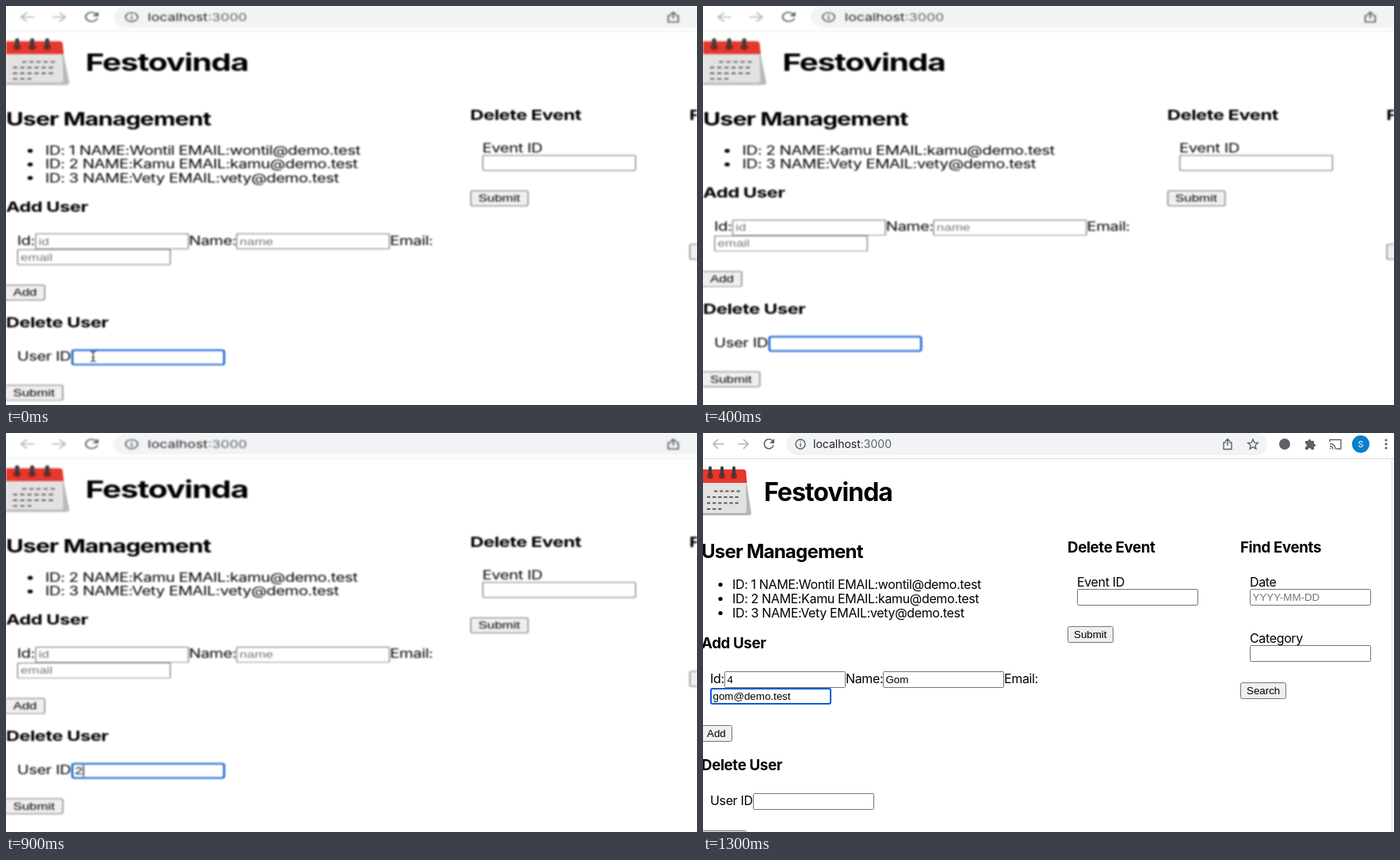
These frames come from a looping animation (872 px wide and 504 px high, 1500 ms). An HTML page:

```html
<!DOCTYPE html>
<html lang="en">
<head>
<meta charset="utf-8">
<title>User list</title>
<style>
  html, body { margin: 0; width: 100%; height: 100%; overflow: hidden; background: #fff; }
  svg { display: block; width: 872px; height: 504px; }
  text { font: 16px Inter, sans-serif; letter-spacing: -.022em; font-optical-sizing: none; white-space: pre; }
  .h1 { font-size: 32px; font-weight: 700; letter-spacing: -.031em; }
  .h2 { font-size: 24px; font-weight: 700; letter-spacing: -.032em; }
  .h3 { font-size: 18.72px; font-weight: 700; letter-spacing: -.02em; }
  .ui { font: 13.33px "Liberation Sans", Arial, sans-serif; letter-spacing: 0; }
  .hint { fill: #757575; }
  .url { font-size: 14px; letter-spacing: 0; fill: #202124; }
  .icon { fill: none; stroke: #5f6368; stroke-width: 1.6; }
  .thin { stroke-width: 1.4; }
  .off { stroke: #b4b6b9; }
</style>
</head>
<body>
<svg id="stage" viewBox="0 0 872 504"></svg>
<script>
const stage = document.getElementById('stage');
const LOOP = 1500;
const ROW = 18;

const users = ['Wontil', 'Kamu', 'Vety'].map((name, i) =>
  `ID: ${i + 1} NAME:${name} EMAIL:${name.toLowerCase()}@demo.test`);

// Each scene lasts until the next one starts
const filled = { zoom: false, removed: 0, add: ['4', 'Gom', 'gom@demo.test'], focus: 'email' };
const scenes = [
  { at: 0, removed: 0, pointer: true },
  { at: 200, removed: 0, userId: '1', caret: true },
  { at: 400, removed: 1 },
  { at: 600, removed: 1, caret: true },
  { at: 800, ...filled },
  { at: 900, removed: 1, userId: '2', caret: true },
  { at: 1100, removed: 2 },
  { at: 1300, ...filled },
].map(scene => ({ zoom: true, add: ['', '', ''], userId: '', focus: 'userId', ...scene }));

const text = (x, y, str, cls = '') => `<text x="${x}" y="${y}" class="${cls}">${str}</text>`;
const path = (d, cls = 'icon') => `<path d="${d}" class="${cls}"/>`;
const fill = (d, color) => `<path d="${d}" fill="${color}"/>`;

function input(x, y, value = '', hint = '', focused = false) {
  const edge = focused
    ? `x="${x + 1}" y="${y + 1}" width="151" height="19" rx="2" stroke="#0b5ecf" stroke-width="2"`
    : `x="${x + .5}" y="${y + .5}" width="152" height="20" rx="1" stroke="#767676"`;
  return `<rect ${edge} fill="#fff"/>` + text(x + 3.5, y + 15, value || hint, value ? 'ui' : 'ui hint');
}

const button = (x, y, w, label) =>
  `<rect x="${x + .5}" y="${y + .5}" width="${w - 1}" height="20" rx="2" fill="#efefef" stroke="#767676"/>` +
  text(x + 8, y + 15, label, 'ui');

const toolbar =
  '<rect x="105" y="0" width="607" height="28" rx="14" fill="#f1f3f4"/>' +
  '<path d="M-4 32.5H876M869.5 33V540" stroke="#dcdee1"/>' +
  path('M26 14H13M19 8L13 14L19 20M44 14H57M51 8L57 14L51 20', 'icon off') +
  path('M88 10A6 6 0 1 0 89 15.5') + fill('M90 7V13H84z', '#5f6368') +
  path('M129 14A6 6 0 1 1 117 14A6 6 0 1 1 129 14M123 13V17.5M123 10V11.6', 'icon thin') +
  text(139, 19, 'localhost<tspan fill="#5f6368">:3000</tspan>', 'url') +
  path('M660 12H657V20.5H667V12H664M662 16V8M659 10.5L662 7.5L665 10.5', 'icon thin') +
  path('M694 8L695.8 12.2L700.3 12.6L696.9 15.5L697.9 20L694 17.6L690.1 20L691.1 15.5L687.7 12.6L692.2 12.2z',
    'icon thin') +
  '<circle cx="734" cy="14" r="7" fill="#5f6368"/>' +
  fill('M760 10H763.5A2 2 0 1 1 767.5 10H771V13.5A2 2 0 1 1 771 17.5V21H767.5A2 2 0 0 0 763.5 21H760V17.5A2 2 0 0 0 760 13.5z',
    '#5f6368') +
  path('M791 11V8.5H805V20H799M791 19.5H792.5M791 16.5Q795 16.5 795 20.5M791 13.5Q798 13.5 798 20.5', 'icon thin') +
  '<circle cx="830" cy="14" r="11" fill="#0b80c8"/>' +
  '<text x="830" y="18" text-anchor="middle" style="font-size:11px;fill:#fff">S</text>' +
  [9, 14, 19].map(y => `<circle cx="862" cy="${y}" r="1.6" fill="#5f6368"/>`).join('');

const calendar =
  fill('M-4 62H55L61 101Q61 104 58 104H-4z', '#b9b9b9') +
  fill('M-4 60H54L55 98Q55 101 52 101H-4z', '#e2e2e2') +
  fill('M-4 46H51Q54 46 54.3 49L55.5 63H-4z', '#e5392d') +
  [9, 24, 39].map(x =>
    `<circle cx="${x}" cy="54" r="4" fill="#a51f1b"/>` +
    `<path d="M${x} 44V54" stroke="#3c3a3c" stroke-width="4" stroke-linecap="round"/>`).join('') +
  '<path d="M14 73.5H47M5 81H47M5 88.5H47M5 96H25" stroke="#5d5d60" stroke-width="2" stroke-dasharray="4.2 2.9"/>';

const events =
  text(460, 151, 'Delete Event', 'h3') + text(472, 194, 'Event ID') +
  input(472, 197) + button(460, 244, 58, 'Submit') +
  text(678, 151, 'Find Events', 'h3') + text(690, 194, 'Date') +
  input(690, 197, '', 'YYYY-MM-DD') + text(690, 265, 'Category') +
  input(690, 268) + button(678, 315, 58, 'Search');

const userList = removed => users.slice(removed).map((user, i) =>
  `<circle cx="22" cy="${191.5 + i * ROW}" r="2.6"/>` + text(37, 197 + i * ROW, user)).join('');

const pointerMark = '<path fill="none" stroke="#222" d="M82 457.5Q84.7 457.5 84.7 460Q84.7 457.5 87.5 457.5' +
  'M84.7 460V469M82 471Q84.7 471 84.7 468.5Q84.7 471 87.5 471M83 465.5H86.5"/>';

function forms({ add, userId, focus, caret, pointer }) {
  const caretX = userId ? 75 : 66.5;
  return text(-2, 272, 'Add User', 'h3') +
    text(9, 316, 'Id:') + input(27, 301, add[0], 'id') +
    text(180, 316, 'Name:') + input(227, 301, add[1], 'name') +
    text(380, 316, 'Email:') + input(9, 322, add[2], 'email', focus === 'email') +
    button(-3, 369, 40, 'Add') +
    text(-2, 426, 'Delete User', 'h3') + text(9, 470, 'User ID') +
    input(63, 455, userId, '', focus === 'userId') +
    (caret ? `<path d="M${caretX} 458V473" stroke="#000"/>` : '') +
    (pointer ? pointerMark : '') +
    button(-3, 502, 58, 'Submit') +
    text(-2, 566, 'Event Management', 'h2');
}

function draw(scene) {
  stage.style.filter = scene.zoom ? 'blur(.8px)' : 'none';
  stage.innerHTML =
    `<g transform="${scene.zoom ? 'matrix(1.268 0 0 .952 2.6 .7)' : ''}">` +
    toolbar + calendar +
    text(77, 85.6, 'Festovinda', 'h1') + text(-2, 157.6, 'User Management', 'h2') +
    userList(scene.removed) + events +
    `<g transform="translate(0 ${-ROW * scene.removed})">${forms(scene)}</g></g>`;
}

let shown;
function tick() {
  const t = performance.now() % LOOP;
  const scene = scenes.findLast(s => s.at <= t);
  if (scene !== shown) draw(shown = scene);
  requestAnimationFrame(tick);
}
tick();
</script>
</body>
</html>
```
